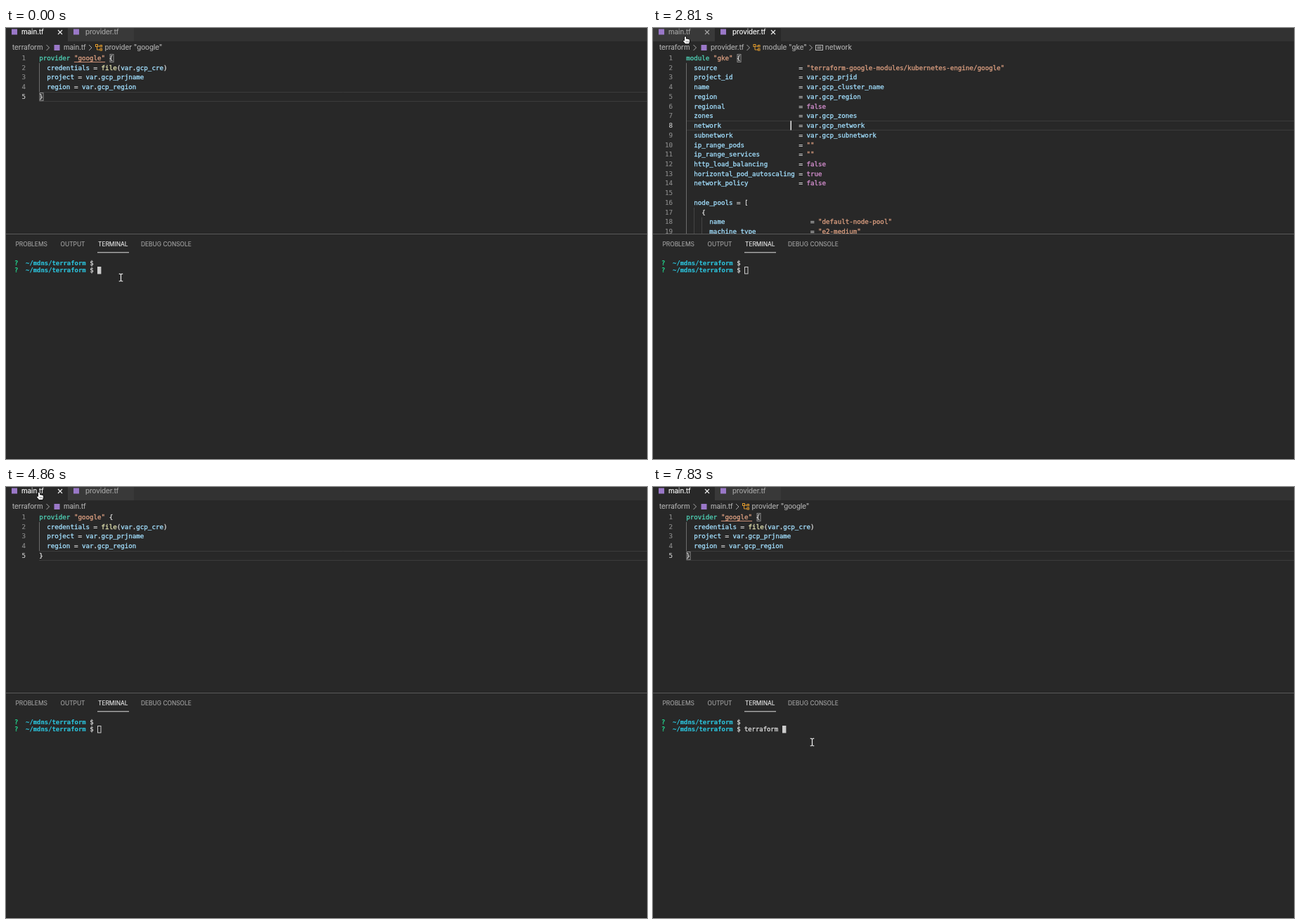
These frames come from a looping animation (912 px wide and 614 px high, 8 s). An HTML page with a canvas:

```html
<!DOCTYPE html>
<html lang="en">
<head>
<meta charset="utf-8">
<title>Editor and terminal</title>
<style>
  html, body { margin: 0; width: 100%; height: 100%; overflow: hidden; background: #282828; }
  canvas { display: block; }
</style>
</head>
<body>
<canvas id="stage" width="912" height="614"></canvas>
<script>
const ctx = document.getElementById('stage').getContext('2d');
const LOOP = 8000;
const MONO = '"DejaVu Sans Mono", monospace';
const UI = 'Inter, sans-serif';
const CODE = { x: 47.2, y: 36.05, cw: 5.524, lh: 13.74, font: '9.18px ' + MONO };
const TERM = { x: 12, cw: 5.36, font: '8.9px ' + MONO };

const MAIN = [
  'provider "google" {',
  '  credentials = file(var.gcp_cre)',
  '  project = var.gcp_prjname',
  '  region = var.gcp_region',
  '}'
];
const attr = (name, value, indent = 2, width = 26) => ' '.repeat(indent) + name.padEnd(width) + ' = ' + value;
const MODULE = [
  'module "gke" {',
  attr('source', '"terraform-google-modules/kubernetes-engine/google"'),
  attr('project_id', 'var.gcp_prjid'),
  attr('name', 'var.gcp_cluster_name'),
  attr('region', 'var.gcp_region'),
  attr('regional', 'false'),
  attr('zones', 'var.gcp_zones'),
  attr('network', 'var.gcp_network'),
  attr('subnetwork', 'var.gcp_subnetwork'),
  attr('ip_range_pods', '""'),
  attr('ip_range_services', '""'),
  attr('http_load_balancing', 'false'),
  attr('horizontal_pod_autoscaling', 'true'),
  attr('network_policy', 'false'),
  '',
  '  node_pools = [',
  '    {',
  attr('name', '"default-node-pool"', 6, 25),
  attr('machine_type', '"e2-medium"', 6, 25)
];

// Pointer moves: start, end, steps, control point, end point
const MOVES = [
  [1040, 1630, 5, 134, 190, 137.5, 8],
  [1930, 2810, 7, 100, 16, 46, 12.3],
  [3100, 3541, 4, 220, 50, 366, 139],
  [3688, 3980, 3, 290, 136, 189, 123],
  [4130, 4130, 1, 186, 123, 184, 122],
  [4270, 4860, 5, 110, 70, 47, 8],
  [5010, 5310, 3, 80, 24, 140, 52],
  [5460, 6340, 7, 488, 320, 226.5, 363.5]
];
const TYPED = [[6790, 2], [6940, 3], [7240, 4], [7390, 6], [7535, 7], [7680, 9], [7830, 10]];

function pointer(t) {
  let x = 163.5, y = 355.5;
  for (const [start, end, n, cx, cy, ex, ey] of MOVES) {
    if (t < start) break;
    const gap = (end - start) / (n - 1) || 1;
    const p = Math.min(n, Math.floor((t - start + 1) / gap) + 1) / n;
    const u = p * p * (3 - 2 * p), v = 1 - u;
    x = v * v * x + 2 * u * v * cx + u * u * ex;
    y = v * v * y + 2 * u * v * cy + u * u * ey;
  }
  return { x, y, hand: y < 35 || (y > 294 && y < 322) };
}

function rect(x, y, w, h, color) {
  ctx.fillStyle = color;
  ctx.fillRect(x, y, w, h);
}

function box(x, y, w, h, color) {
  ctx.strokeStyle = color;
  ctx.lineWidth = 1;
  ctx.strokeRect(x, y, w, h);
}

// A hairline outline gives the slightly heavy look of smoothed text
function text(str, x, y, color, font, weight = .3, align = 'left') {
  ctx.font = font;
  ctx.textAlign = align;
  ctx.fillStyle = ctx.strokeStyle = color;
  ctx.lineWidth = weight;
  ctx.fillText(str, x, y);
  ctx.strokeText(str, x, y);
}

function line(points, color, width = 1) {
  ctx.strokeStyle = color;
  ctx.lineWidth = width;
  ctx.beginPath();
  points.forEach(([x, y]) => ctx.lineTo(x, y));
  ctx.stroke();
}

const label = (str, x, y, color) => text(str, x, y, color, '9.8px ' + UI, .15);
const badge = (x, y) => rect(x - 4, y - 4, 8, 8, '#9a78c8');
const chevron = x => line([[x - 2, 24], [x + 2, 28], [x - 2, 32]], '#a8a8a8');
const colX = col => CODE.x + col * CODE.cw;
const rowY = row => CODE.y + row * CODE.lh;

function closeMark(x, color) {
  line([[x - 3, 3], [x + 3, 9]], color, 1.1);
  line([[x + 3, 3], [x - 3, 9]], color, 1.1);
}

function tab(name, x, w, active, hover) {
  rect(x, 0, w, 19, active ? '#282828' : '#393939');
  badge(x + 12, 5.5);
  label(name, x + (x ? 25 : 22), 9.3, active ? '#ffffff' : '#a6a6a6');
  if (active || hover) closeMark(x ? 171 : 77, active ? '#f0f0f0' : '#a8a8a8');
}

function classIcon(x) {
  const c = '#e09a2c';
  box(x - 4.5, 23.5, 3, 3, c);
  line([[x - 1, 26], [x + 2, 26]], c);
  line([[x - 2.5, 27], [x - 2.5, 31], [x + 2, 31]], c);
  box(x + 2, 24.5, 2.5, 2.5, c);
  box(x + 2, 29.5, 2.5, 2.5, c);
}

function breadcrumbs(main, ready, symbol) {
  const grey = '#b0b0b0', y = 31.4;
  label('terraform', 9, y, grey);
  chevron(59.5);
  badge(72.5, 28);
  label(main ? 'main.tf' : 'provider.tf', 82, y, grey);
  if (!ready) return;
  const x = main ? 120 : 135.5;
  chevron(x);
  classIcon(x + 12);
  label(main ? 'provider "google"' : 'module "gke"', x + 20.5, y, grey);
  if (main) return;
  chevron(224.5);
  box(231.5, 24.5, 10, 7, '#b8b8b8');
  line([[233.5, 27], [239.5, 27]], '#b8b8b8');
  line([[233.5, 29], [239.5, 29]], '#b8b8b8');
  label(symbol, 245, y, grey);
}

function tokenColor(word) {
  if (word[0] === '"') return '#dc9f80';
  if (/^(provider|module)$/.test(word)) return '#4ecfb4';
  if (/^(true|false)$/.test(word)) return '#d58fd0';
  if (word === 'file') return '#e2e2b0';
  return /\w/.test(word) ? '#a2dffe' : '#dedede';
}

function bracketBox(row, col) {
  box(Math.round(colX(col)) + 1, Math.round(rowY(row)) + 1.5, 5, 11, '#8c8c8c');
}

function guide(col, from, to) {
  const x = Math.round(colX(col)) + .5;
  line([[x, rowY(from)], [x, rowY(to)]], col ? '#444444' : '#6c6c6c');
}

// Selected part of a row, with its spaces shown as dots
function select(row, from, to) {
  rect(colX(from), rowY(row), (to - from) * CODE.cw, CODE.lh, '#2d6191');
  for (let c = from; c < Math.min(to, MODULE[row].length); c++) {
    if (MODULE[row][c] === ' ') rect(colX(c) + 2.3, rowY(row) + 6.6, 1, 1, '#6386a5');
  }
}

function selection(t) {
  if (t < 3835) return;
  if (t < 3980) return select(7, 36, 46);
  select(6, t < 4130 ? 34 : 25, 45);
  select(7, 0, 46);
}

function caret(row, col) {
  rect(Math.round(colX(col)) - .5, rowY(row), 1.5, CODE.lh - .5, '#e6e6e6');
}

function editor(t, main, ready) {
  const lines = main ? MAIN : MODULE;
  const active = main ? 4 : t < 3980 ? 7 : 6;
  ctx.save();
  ctx.beginPath();
  ctx.rect(0, 35, 912, 258);
  ctx.clip();

  if (main || t < 3835) {
    const y = Math.round(rowY(active)) + .5;
    line([[47, y], [912, y]], '#3b3b3b');
    line([[47, y + 13], [912, y + 13]], '#3b3b3b');
  }
  if (!main) selection(t);
  guide(0, 1, main ? 4 : 19);
  if (!main) {
    guide(2, 16, 19);
    guide(4, 17, 19);
  }
  if (ready) {
    bracketBox(0, lines[0].length - 1);
    if (main) bracketBox(4, 0);
  }

  lines.forEach((str, row) => {
    const y = rowY(row) + 9.8;
    text(row + 1, 28, y, row === active ? '#d0d0d0' : '#8a8a8a', CODE.font, .15, 'right');
    for (const m of str.matchAll(/"[^"]*"|\w+|[^\s\w"]/g)) {
      text(m[0], colX(m.index), y, tokenColor(m[0]), CODE.font);
    }
  });
  if (main && ready) line([[colX(9), 48.5], [colX(17), 48.5]], '#ce9178');

  if (!main) {
    if (t < 3541) caret(7, 27);
    else if (t < 3835) caret(7, 46);
    else if (t < 3980) caret(7, 36);
    else caret(6, t < 4130 ? 34 : 25);
  } else if ((t >= 5010 && t < 5460) || (t >= 5900 && t < 6040)) {
    caret(4, 1);
  }
  ctx.restore();
}

function panel(t, focused) {
  line([[0, 293.5], [912, 293.5]], '#5a5a5a');
  const heads = [['PROBLEMS', 13.5], ['OUTPUT', 77.5], ['TERMINAL', 131], ['DEBUG CONSOLE', 192]];
  for (const [name, x] of heads) {
    text(name, x, 311.1, name === 'TERMINAL' ? '#efefef' : '#a6a6a6', '8.4px ' + UI, .1);
  }
  line([[130, 319.8], [175, 319.8]], '#e0e0e0');

  const at = col => TERM.x + col * TERM.cw;
  for (const y of [337.6, 348.3]) {
    text('?', at(0), y, '#23d18b', 'bold ' + TERM.font, .15);
    text('~/mdns/terraform', at(3), y, '#2cc3dc', 'bold ' + TERM.font, .15);
    text('$', at(20), y, '#d0d0d0', TERM.font);
  }
  const count = TYPED.reduce((n, [start, len]) => t >= start ? len : n, 0);
  text('terraform '.slice(0, count), at(22), 348.3, '#dddddd', TERM.font);
  const x = Math.round(at(22 + count));
  if (focused) rect(x, 340, 5.4, 10.5, '#cccccc');
  else box(x + .5, 340.5, 4.5, 9.5, '#cccccc');
}

function drawPointer({ x, y, hand }) {
  ctx.save();
  ctx.translate(x, y);
  ctx.lineJoin = 'round';
  if (hand) {
    const p = new Path2D('M-1 .5Q0-.8 1 .5V3.6L2 3 3 3.8 4 3.4 5 4.2 6 4.3V7L5 10H0L-3 6.4Q-3.2 5-1 6Z');
    ctx.strokeStyle = '#111111';
    ctx.lineWidth = 1.6;
    ctx.stroke(p);
    ctx.fillStyle = '#ffffff';
    ctx.fill(p);
    for (const fx of [1, 2.7, 4.3]) line([[fx, 6], [fx, 8.4]], '#444444', .6);
  } else {
    line([[0, -4.5], [0, 4.5]], '#f0f0f0', 1.2);
    for (const s of [-1, 1]) {
      line([[-2.8, 5.3 * s], [-1, 5.1 * s], [0, 4.2 * s], [1, 5.1 * s], [2.8, 5.3 * s]], '#f0f0f0', 1.1);
    }
  }
  ctx.restore();
}

function draw(t) {
  const mouse = pointer(t);
  const main = t < 1930 || t >= 4860;
  const ready = !(t >= 1930 && t < 2077) && !(t >= 4860 && t < 5010);
  const overTabs = mouse.y < 18;

  rect(0, 0, 912, 614, '#282828');
  rect(182, 0, 730, 19, '#323232');
  tab('main.tf', 0, 88, main, overTabs && mouse.x < 88);
  tab('provider.tf', 88, 94, !main, overTabs && mouse.x >= 88 && mouse.x < 182);
  breadcrumbs(main, ready, t < 3980 ? 'network' : 'zones');
  editor(t, main, ready);
  panel(t, t < 1930 || t >= 6040);
  rect(0, 613, 912, 1, '#222222');
  drawPointer(mouse);
}

const began = performance.now();
function tick() {
  draw((performance.now() - began) % LOOP);
  requestAnimationFrame(tick);
}
tick();
</script>
</body>
</html>
```
